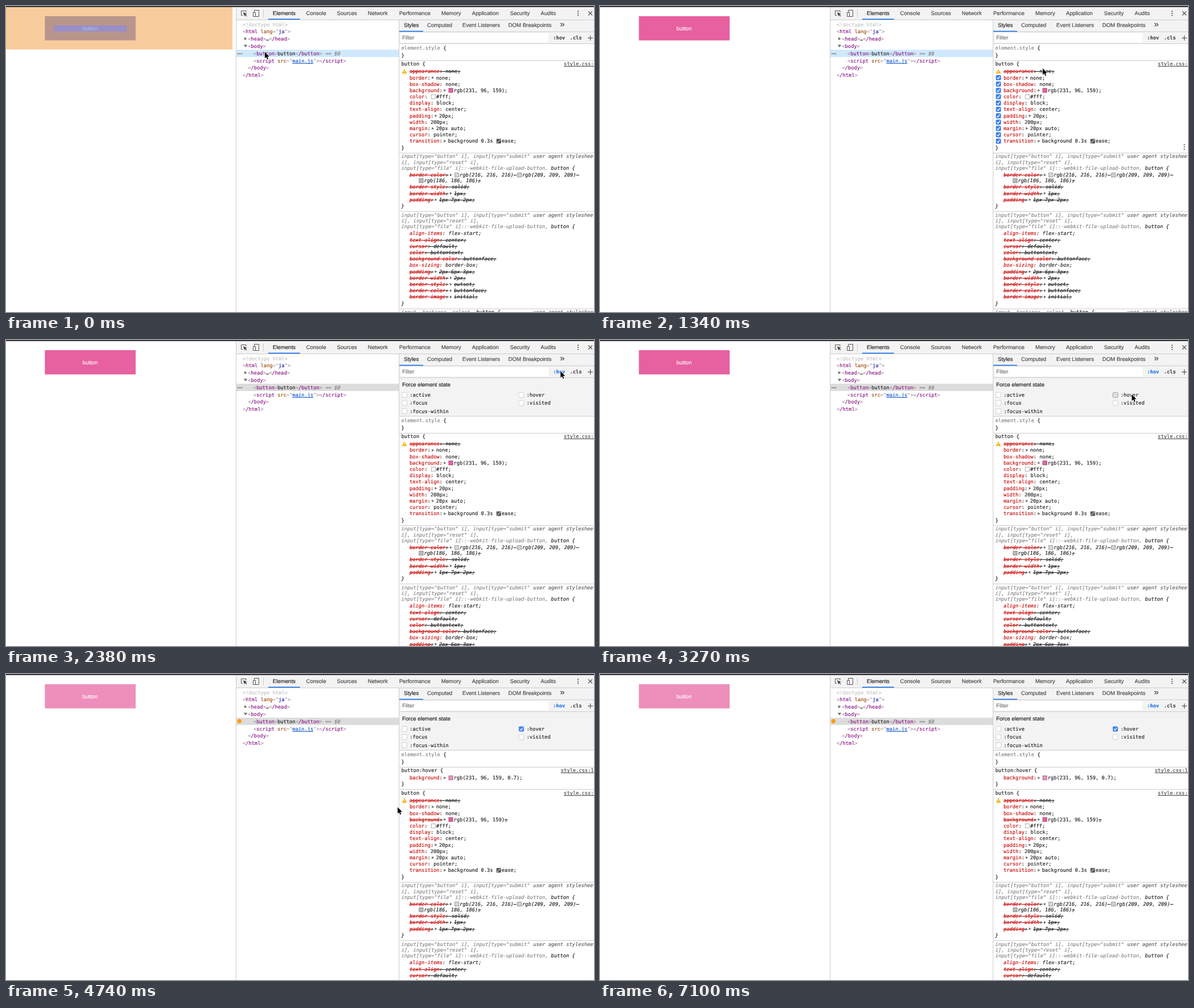
Animation of 1036x540 px, one loop 7.46 s. Source, as an HTML page with a canvas:

```html
<!DOCTYPE html>
<html lang="en">
<head>
<meta charset="utf-8">
<title>Forcing an element state</title>
<style>
html, body { margin: 0; width: 100%; height: 100%; overflow: hidden; background: #fff; }
canvas { display: block; }
</style>
</head>
<body>
<canvas id="stage" width="1036" height="540"></canvas>
<script>
const ctx = document.getElementById('stage').getContext('2d');
const LOOP = 7460, TICK = 147.9;
const MONO = '8.78px "DejaVu Sans Mono", monospace';
const SANS = '9.65px "Liberation Sans", Arial, sans-serif';
const INK = '#1c1c1c', RED = '#c80000', GRAY = '#808080', LINE = '#ccc', BAR = '#f3f3f3', BLUE = '#1a73e8';
const PINK = 'rgb(231, 96, 159)', SOFT_PINK = 'rgba(231, 96, 159, 0.7)';

// Pointer tip: tick, x, y
const path = [
  [0, 456, 81], [1, 457, 150], [2, 456, 195], [5, 456, 195], [7, 590, 126],
  [9, 780, 110], [10, 880, 99], [11, 945, 75], [13, 977, 55], [16, 977, 55],
  [21, 937, 96], [26, 937, 96], [27, 920, 133], [29, 800, 215], [31, 631, 240],
  [32, 690, 235], [34, 900, 160], [35, 930, 108], [37, 859, 202], [39, 866, 206],
  [41, 866, 206], [43, 905, 330], [45, 967, 521], [46, 967, 521], [47, 973, 527], [48, 980, 560]
];

const authorProps = [
  ['appearance', 'none', 'off'], ['border', '▸none'], ['box-shadow', 'none'],
  ['background', `▸[${PINK}]${PINK}`], ['color', '[#fff]#fff'], ['display', 'block'],
  ['text-align', 'center'], ['padding', '▸20px'], ['width', '200px'],
  ['margin', '▸20px auto'], ['cursor', 'pointer'], ['transition', '▸background 0.3s [ease]ease']
];
const agentPropsA = [
  ['border-color', '▸[#d8d8d8]rgb(216, 216, 216) [#d1d1d1]rgb(209, 209, 209) \n[#bababa]rgb(186, 186, 186)', 'off'],
  ['border-style', 'solid', 'off'], ['border-width', '▸1px', 'off'], ['padding', '▸1px 7px 2px', 'off']
];
const agentPropsB = [
  ['align-items', 'flex-start'], ['text-align', 'center', 'off'], ['cursor', 'default', 'off'],
  ['color', 'buttontext', 'off'], ['background-color', 'buttonface', 'off'], ['box-sizing', 'border-box'],
  ['padding', '▸2px 6px 3px', 'off'], ['border-width', '▸2px', 'off'], ['border-style', '▸outset', 'off'],
  ['border-color', '▸buttonface', 'off'], ['border-image', '▸initial', 'off']
];
const agentSelector = [
  'input[type="button" i], input[type="submit"', 'i], input[type="reset" i],',
  'input[type="file" i]::-webkit-file-upload-button, |button {'
];

function rect(x, y, w, h, color) {
  ctx.fillStyle = color;
  ctx.fillRect(x, y, w, h);
}

function poly(points, color) {
  ctx.beginPath();
  points.forEach(([x, y]) => ctx.lineTo(x, y));
  ctx.closePath();
  ctx.fillStyle = color;
  ctx.fill();
}

function stroke(points, color, width = 1) {
  ctx.beginPath();
  points.forEach(([x, y], i) => i ? ctx.lineTo(x, y) : ctx.moveTo(x, y));
  ctx.strokeStyle = color;
  ctx.lineWidth = width;
  ctx.stroke();
}

function dot(x, y, r, color) {
  ctx.beginPath();
  ctx.arc(x, y, r, 0, 7);
  ctx.fillStyle = color;
  ctx.fill();
}

// Draws slightly thickened text around the middle line y and returns its right end
function text(str, x, y, color = INK, font = MONO) {
  const base = Math.round(y + 3);
  ctx.font = font;
  ctx.fillStyle = ctx.strokeStyle = color;
  ctx.lineWidth = 0.15;
  ctx.fillText(str, x, base);
  ctx.strokeText(str, x, base);
  return x + ctx.measureText(str).width;
}

function runs(x, y, list) {
  for (const [str, color, font] of list) x = text(str, x, y, color, font);
  return x;
}

function underlined(str, x, y, color) {
  const end = text(str, x, y, color);
  rect(x, Math.round(y + 4), end - x, 1, color);
  return end;
}

function kebab(x, y, gap) {
  for (const k of [-1, 0, 1]) dot(x, y + k * gap, 1.1, '#555');
}

function checkbox(x, y, checked, pressed) {
  ctx.beginPath();
  ctx.roundRect(x, y - 4.5, 9, 9, 1.8);
  ctx.fillStyle = checked ? '#3a7ff0' : pressed ? '#dedede' : '#fff';
  ctx.fill();
  if (checked) {
    stroke([[x + 2, y], [x + 4, y + 2.3], [x + 7, y - 2.5]], '#fff', 1.3);
  } else {
    ctx.strokeStyle = pressed ? '#999' : '#c4c4c4';
    ctx.lineWidth = 0.8;
    ctx.stroke();
  }
}

function warning(y) {
  poly([[702, y - 4.5], [706.5, y + 4], [697.5, y + 4]], '#f2b60c');
  rect(701.5, y - 2, 1, 3.2, '#fff');
  rect(701.5, y + 2, 1, 1, '#fff');
}

function swatch(x, y, color) {
  if (color === 'ease') {
    rect(x + 1, y - 4, 8, 8, '#555');
    stroke([[x + 2, y + 2.5], [x + 4.5, y + 1], [x + 5.5, y - 1], [x + 8, y - 2.5]], '#fff');
    return;
  }
  rect(x + 1, y - 4, 8, 8, '#fff');
  rect(x + 1, y - 4, 8, 8, color);
  ctx.strokeStyle = 'rgba(90, 90, 90, 0.6)';
  ctx.lineWidth = 0.8;
  ctx.strokeRect(x + 1.4, y - 3.6, 7.2, 7.2);
}

// Draws one declaration and returns its last line; colours are never struck through
function declaration(y, [name, value, off], font) {
  let x = 711;
  const put = (str, color, keep) => {
    const end = text(str, x, y, color, font);
    if (off && !keep) rect(x, Math.round(y), end - x, 1, color);
    x = end;
  };
  put(name, RED);
  put(value[0] === '▸' ? ':' : ': ', INK);
  for (const part of (value + ';').split(/(▸|\n|\[[^\]]*\]|rgba?\([^)]*\))/)) {
    if (!part) continue;
    if (part === '▸') {
      poly([[x + 2.4, y - 2.4], [x + 6.4, y], [x + 2.4, y + 2.4]], '#6e6e6e');
      x += 9.7;
    } else if (part === '\n') {
      x = 726.5;
      y += 10;
    } else if (part[0] === '[') {
      swatch(x, y, part.slice(1, -1));
      x += 10;
    } else {
      put(part, INK, part.startsWith('rgb'));
    }
  }
  return y;
}

// Draws a style rule and returns where the next one starts
function rule(y, selector, props, { link, agent, pointer } = {}) {
  const font = agent ? 'italic ' + MONO : MONO;
  const top = y - 9.5;
  if (agent) text('user agent stylesheet', 929, y, '#5a5a5a', font);
  if (link) underlined(link, 1041 - link.length * 5.285, y, '#444');
  selector.forEach((line, i) => {
    const [dim, lit] = line.includes('|') ? line.split('|') : agent ? [line, ''] : ['', line];
    if (i) y += 10.3;
    runs(696.5, y, [[dim, GRAY, font], [lit, INK, font]]);
  });
  y += agent ? 12.2 : 13;
  const end = y + props.length * 11.2;
  const hovered = link && pointer[0] > 693 && pointer[1] > top && pointer[1] < end + 6;
  for (const prop of props) {
    if (prop[0] === 'appearance') warning(y);
    else if (hovered) checkbox(697.5, y, true);
    y = declaration(y, prop, font) + 11.2;
  }
  text('}', 696.5, y, INK, font);
  if (hovered) kebab(1029.5, y - 1, 4.2);
  rect(693, Math.round(y + 9), 343, 1, LINE);
  return y + 15.7;
}

function page(tick) {
  rect(0, 0, 1036, 540, '#fff');
  const alpha = tick < 23 ? 1 : tick < 24 ? 0.85 : 0.7;
  const box = [68.5, 18, 160, 42.7], content = [84.5, 34.3, 128, 10.6];
  rect(...box, `rgba(231, 96, 159, ${alpha})`);
  text('button', 134.8, 40, '#fff', SANS);
  if (tick > 0) return;
  const ring = (outer, inner, color) => {
    ctx.beginPath();
    ctx.rect(...outer);
    ctx.rect(...inner);
    ctx.fillStyle = color;
    ctx.fill('evenodd');
  };
  ring([0, 2, 399, 74.8], box, 'rgba(246, 178, 107, .66)');
  ring(box, content, 'rgba(147, 196, 125, .55)');
  rect(...content, 'rgba(111, 168, 220, .66)');
}

function toolbar() {
  rect(406, 2, 630, 22, BAR);
  rect(406, 24, 630, 1, LINE);
  const tabs = { Elements: 470, Console: 528.7, Sources: 583, Network: 637.3, Performance: 692.7,
    Memory: 767, Application: 821, Security: 888, Audits: 942 };
  for (const name in tabs) text(name, tabs[name], 13, name === 'Elements' ? INK : '#444', SANS);
  rect(462, 22.5, 56, 1.6, BLUE);

  stroke([[423, 11], [423, 8.5], [414.5, 8.5], [414.5, 16.5], [417, 16.5]], '#555');
  poly([[418, 11], [425, 14], [422, 15], [424.5, 17.6], [423.5, 18.6], [421, 16], [420, 18.5]], '#444');
  ctx.strokeStyle = '#555';
  ctx.lineWidth = 1;
  ctx.strokeRect(437.5, 7.5, 8, 11);
  rect(434, 11, 5, 8, BAR);
  ctx.strokeRect(435.5, 11.5, 4, 7);
  rect(453, 6, 1, 14, LINE);
  kebab(1008, 13, 3.6);
  stroke([[1026, 9.5], [1033, 16.5]], '#555', 1.2);
  stroke([[1033, 9.5], [1026, 16.5]], '#555', 1.2);
}

function tree(tick) {
  const P = '#a894a6', T = '#881280', A = '#994500', V = '#1a1aa6';
  const row = k => 32.5 + k * 12.8;
  const tag = name => [['<', P], [name, T], ['>', P]];
  rect(406, 77.2, 286, 12.8, tick < 14 ? '#cfe8fc' : '#dcdcdc');
  text('<!doctype html>', 417, row(0), '#c0c0c0');
  runs(417, row(1), [['<', P], ['html ', T], ['lang', A], ['="', P], ['ja', V], ['">', P]]);
  poly([[420, 55], [424.5, 57.8], [420, 60.6]], '#6e6e6e');
  runs(426.3, row(2), [...tag('head'), ['…'], ...tag('/head')]);
  poly([[418.8, 68.6], [425.2, 68.6], [422, 73]], '#6e6e6e');
  runs(426.3, row(3), tag('body'));
  runs(436, row(4), [...tag('button'), ['button'], ...tag('/button'), [' == $0', '#777', 'italic ' + MONO]]);
  let x = runs(436, row(5), [['<', P], ['script ', T], ['src', A], ['="', P]]);
  x = underlined('main.js', x, row(5), '#1155cc');
  runs(x, row(5), [['">', P], ...tag('/script')]);
  runs(426.3, row(6), tag('/body'));
  runs(417, row(7), tag('/html'));
  if (tick < 23) for (const k of [0, 1, 2]) dot(409 + k * 3.1, 84.3, 1, '#555');
  else dot(411.2, 83.2, 3.7, '#ff9d0a');
}

function statePane(tick) {
  rect(693, 67, 343, 67, BAR);
  rect(693, 134, 343, 1, LINE);
  text('Force element state', 698, 79, INK, SANS);
  [':active', ':focus', ':focus-within', ':hover', ':visited'].forEach((name, i) => {
    const x = i < 3 ? 697.5 : 903.5, y = 97 + i % 3 * 14.3;
    const hover = name === ':hover';
    checkbox(x, y, hover && tick >= 23, hover && tick === 22);
    text(name, x + 13.7, y);
  });
}

function styles(tick, pointer) {
  const open = tick >= 15, forced = tick >= 23;
  rect(693, 25, 343, 41, BAR);
  rect(693, 45, 343, 1, LINE);
  rect(693, 66, 343, 1, LINE);
  const tabs = { Styles: 701, Computed: 742, 'Event Listeners': 804, 'DOM Breakpoints': 885 };
  for (const name in tabs) text(name, tabs[name], 34, name === 'Styles' ? INK : '#444', SANS);
  rect(693, 43.8, 42, 1.6, BLUE);
  text('»', 976, 33.5, '#444', '15px "Liberation Sans", Arial, sans-serif');
  rect(696, 48, 260, 16, '#fff');
  text('Filter', 698, 56, '#757575', SANS);
  text(':hov', 964, 56, open ? BLUE : '#444', 'bold ' + MONO);
  text('.cls', 993.5, 56, '#444', 'bold ' + MONO);
  stroke([[1025, 56.5], [1034, 56.5]], '#555', 1.2);
  stroke([[1029.5, 52], [1029.5, 61]], '#555', 1.2);
  if (open) statePane(tick);

  let y = rule(open ? 141.6 : 73.6, ['element.style| {'], []);
  if (forced) {
    y = rule(y, ['button:hover {'], [['background', `▸[${SOFT_PINK}]${SOFT_PINK.replace('rgba', 'rgb')}`]],
      { link: 'style.css:15', pointer });
  }
  const props = authorProps.map(p => forced && p[0] === 'background' ? [...p, 'off'] : p);
  y = rule(y, ['button {'], props, { link: 'style.css:1', pointer });
  y = rule(y, agentSelector, agentPropsA, { agent: true });
  y = rule(y, agentSelector, agentPropsB, { agent: true });
  rule(y, ['input, textarea, select, |button {'], [], { agent: true });
}

function pointerAt(tick) {
  const i = path.findIndex(p => p[0] >= tick);
  if (i < 0) return path[path.length - 1].slice(1);
  const [t1, x1, y1] = path[i], [t0, x0, y0] = path[Math.max(i - 1, 0)];
  const k = t1 > t0 ? (tick - t0) / (t1 - t0) : 0;
  return [x0 + (x1 - x0) * k, y0 + (y1 - y0) * k];
}

function arrow([x, y]) {
  const shape = [[0, 0], [0, 11.4], [2.6, 9.1], [4.4, 13.2], [6.2, 12.4], [4.5, 8.5], [8, 8.3]]
    .map(([dx, dy]) => [x + dx, y + dy]);
  ctx.lineJoin = 'round';
  stroke([...shape, shape[0]], '#fff', 1.8);
  poly(shape, '#000');
}

function draw(now) {
  const tick = Math.floor(now % LOOP / TICK);
  const pointer = pointerAt(tick);
  ctx.textRendering = 'geometricPrecision';
  page(tick);
  toolbar();
  tree(tick);
  styles(tick, pointer);
  rect(405, 2, 1, 538, LINE);
  rect(692, 25, 1, 515, LINE);
  rect(0, 0, 1036, 2, '#343436');
  arrow(pointer);
}

const start = performance.now();
function loop() {
  draw(performance.now() - start);
  requestAnimationFrame(loop);
}
loop();
</script>
</body>
</html>
```
